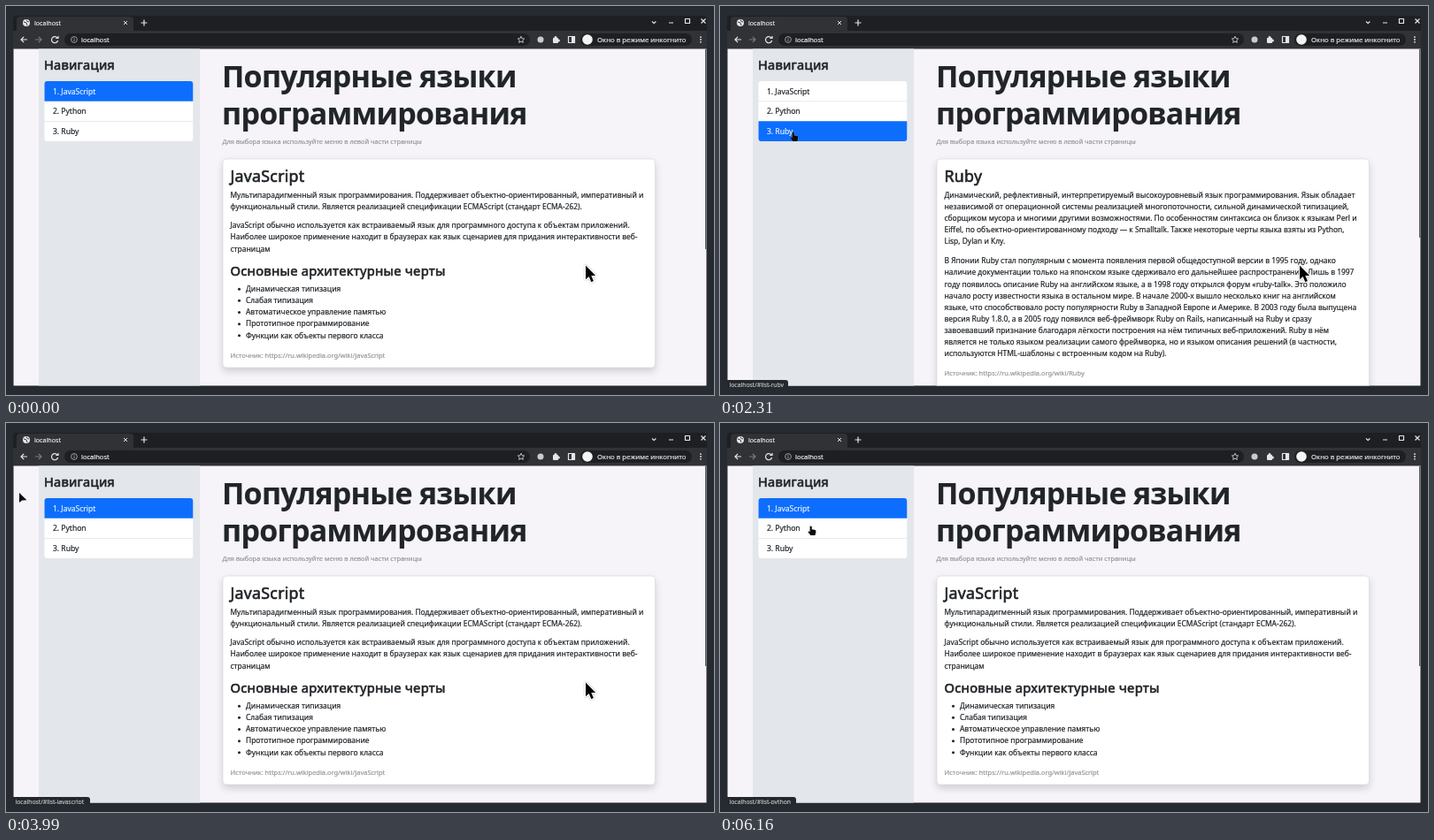
An HTML page with a canvas that plays this animation: 800x440 px, repeating every 6.23 s.

```html
<!DOCTYPE html>
<html lang="ru">
<head>
<meta charset="utf-8">
<title>localhost</title>
<style>
html, body { margin: 0; width: 800px; height: 440px; overflow: hidden; background: #262b31; }
canvas { display: block; filter: blur(0.35px); }
</style>
</head>
<body>
<canvas id="stage" width="800" height="440"></canvas>
<script>
const ctx = document.getElementById('stage').getContext('2d');
const LOOP = 6230, STEP = 70, LINE = 13.15;
const INK = '#212529', MUTED = '#94969a', ICON = '#e4e6e8', DIM = '#8d9195';
const NAMES = ['JavaScript', 'Python', 'Ruby'];

// Each block: kind, first baseline, lines
const PAGES = [
  [
    ['p', 216.7, `Мультипарадигменный язык программирования. Поддерживает объектно-ориентированный, императивный и
функциональный стили. Является реализацией спецификации ECMAScript (стандарт ECMA-262).`],
    ['p', 251.3, `JavaScript обычно используется как встраиваемый язык для программного доступа к объектам приложений.
Наиболее широкое применение находит в браузерах как язык сценариев для придания интерактивности веб-
страницам`],
    ['h', 304.7, 'Основные архитектурные черты'],
    ['li', 323, `Динамическая типизация
Слабая типизация
Автоматическое управление памятью
Прототипное программирование
Функции как объекты первого класса`],
    ['src', 397.5, 'Источник: https://ru.wikipedia.org/wiki/JavaScript']
  ],
  [
    ['p', 216.7, `Высокоуровневый язык программирования общего назначения с динамической строгой типизацией и
автоматическим управлением памятью, ориентированный на повышение производительности разработчика,
читаемости кода и его качества, а также на обеспечение переносимости написанных на нём программ.`],
    ['p', 264.7, `Стандартная библиотека включает большой набор полезных переносимых функций, начиная с возможностей
для работы с текстом и заканчивая средствами для написания сетевых приложений. Дополнительные
возможности, такие как математическое моделирование, работа с оборудованием, написание веб-приложений
или разработка игр, могут реализовываться посредством обширного количества сторонних библиотек, а также
интеграцией библиотек, написанных на Си или C++, при этом и сам интерпретатор Python может
интегрироваться в проекты, написанные на этих языках.`],
    ['h', 357.5, 'Популярность языка'],
    ['p', 375.3, `Python стал одним из самых популярных языков, он используется в анализе данных, машинном обучении,
DevOps и веб-разработке, а также в других сферах, включая разработку игр. За счёт читабельности, простого
синтаксиса и отсутствия необходимости в компиляции язык хорошо подходит для обучения
программированию, позволяя концентрироваться на изучении алгоритмов, концептов и парадигм.`]
  ],
  [
    ['p', 216.7, `Динамический, рефлективный, интерпретируемый высокоуровневый язык программирования. Язык обладает
независимой от операционной системы реализацией многопоточности, сильной динамической типизацией,
сборщиком мусора и многими другими возможностями. По особенностям синтаксиса он близок к языкам Perl и
Eiffel, по объектно-ориентированному подходу — к Smalltalk. Также некоторые черты языка взяты из Python,
Lisp, Dylan и Клу.`],
    ['p', 291.2, `В Японии Ruby стал популярным с момента появления первой общедоступной версии в 1995 году, однако
наличие документации только на японском языке сдерживало его дальнейшее распространение. Лишь в 1997
году появилось описание Ruby на английском языке, а в 1998 году открылся форум «ruby-talk». Это положило
начало росту известности языка в остальном мире. В начале 2000-х вышло несколько книг на английском
языке, что способствовало росту популярности Ruby в Западной Европе и Америке. В 2003 году была выпущена
версия Ruby 1.8.0, а в 2005 году появился веб-фреймворк Ruby on Rails, написанный на Ruby и сразу
завоевавший признание благодаря лёгкости построения на нём типичных веб-приложений. Ruby в нём
является не только языком реализации самого фреймворка, но и языком описания решений (в частности,
используются HTML-шаблоны с встроенным кодом на Ruby).`],
    ['src', 418, 'Источник: https://ru.wikipedia.org/wiki/Ruby']
  ]
];

// Keyframes: time, x, y
const POINTER = [
  [450, 4, 84], [950, 103, 117], [1650, 103, 117], [1950, 83, 143], [2650, 83, 143],
  [2900, 84, 119], [3150, 84, 119], [3350, 82, 98], [3620, 82, 98], [3990, 15, 79], [4130, 0, 76],
  [5400, 4, 84], [5850, 103, 117], [LOOP, 103, 117]
];
const BIG_POINTER = [[0, 655, 293.5], [4650, 655, 293.5], [4970, 605.5, 313.5], [5450, 500, 445], [LOOP, 500, 445]];

function at(keys, t) {
  let i = 1;
  while (i < keys.length - 1 && keys[i][0] < t) i++;
  const [a, b] = [keys[i - 1], keys[i]];
  const k = Math.min(1, Math.max(0, (t - a[0]) / (b[0] - a[0])));
  const e = k * k * (3 - 2 * k);
  return [a[1] + (b[1] - a[1]) * e, a[2] + (b[2] - a[2]) * e];
}

function rect(x, y, w, h, fill, radius = 0) {
  ctx.fillStyle = fill;
  ctx.beginPath();
  ctx.roundRect(x, y, w, h, radius);
  ctx.fill();
}

function text(str, x, y, size, fill = INK, { weight = 400, spacing = 0, edge = 0.2 } = {}) {
  ctx.font = `${weight} ${size}px "Noto Sans", "Open Sans", sans-serif`;
  ctx.letterSpacing = spacing + 'px';
  ctx.fillStyle = ctx.strokeStyle = fill;
  ctx.lineWidth = edge;
  ctx.lineJoin = 'round';
  ctx.fillText(str, x, y);
  ctx.strokeText(str, x, y);
}

// A semi-bold look for section headings
function heading(str, x, y, size) {
  text(str, x, y, size, INK, { spacing: 0.25, edge: 0.65 });
}

function stroke(d, color = ICON, width = 1.2) {
  ctx.strokeStyle = color;
  ctx.lineWidth = width;
  ctx.stroke(new Path2D(d));
}

function dot(x, y, r, fill) {
  ctx.fillStyle = fill;
  ctx.beginPath();
  ctx.arc(x, y, r, 0, 7);
  ctx.fill();
}

function ring(x, y, r, color = ICON, width = 1) {
  ctx.strokeStyle = color;
  ctx.lineWidth = width;
  ctx.beginPath();
  ctx.arc(x, y, r, 0, 7);
  ctx.stroke();
}

function clip(x, y, w, h, paint) {
  ctx.save();
  ctx.beginPath();
  ctx.rect(x, y, w, h);
  ctx.clip();
  paint();
  ctx.restore();
}

function shape(d, x, y, fill, edge, width) {
  const path = new Path2D(d);
  ctx.save();
  ctx.translate(x, y);
  ctx.lineJoin = 'round';
  if (edge) {
    ctx.shadowColor = 'rgba(0,0,0,.35)';
    ctx.shadowBlur = 2;
    ctx.strokeStyle = edge;
    ctx.lineWidth = width;
    ctx.stroke(path);
    ctx.shadowColor = 'transparent';
  }
  ctx.fillStyle = fill;
  ctx.fill(path);
  ctx.restore();
}

function browser(focused) {
  const c = focused ? ICON : DIM;
  rect(8, 11, 784, 419, focused ? '#1d1f22' : '#3c4043', [4, 4, 0, 0]);
  rect(12, 12, 132, 18, focused ? '#303236' : '#35383b', [4, 4, 0, 0]);
  rect(8, 28, 784, 21, '#303236');
  dot(23, 19, 4, c);
  stroke('M20 18 l3 1 1 3 M23 15.5 l1 2 2 .5', '#43464a', 1);
  text('localhost', 32, 21.5, 7.1, c);
  stroke('M133 17 l4 4 m0 -4 l-4 4', c, 1);
  stroke('M152.5 19 h7 M156 15.5 v7', c);
  stroke('M730 17.5 l2.2 2.2 2.2 -2.2 M749 19 h5', c);
  stroke('M767.5 14.5 h5 v5 h-5 z', c);
  stroke('M785.5 14.5 l5 5 m0 -5 l-5 5', c);

  stroke('M24 38 h-7 m3.2 -3.2 l-3.2 3.2 3.2 3.2');
  stroke('M33 38 h7 m-3.2 -3.2 l3.2 3.2 -3.2 3.2', '#777a7e');
  stroke('M58 36 a3.6 3.6 0 1 0 .6 3 M59 34 v2.5 h-2.7');
  rect(66, 31, 526, 14, '#1d1f22', 7);
  ring(77, 38, 3.4, '#b8babd', 0.8);
  stroke('M77 37.5 v2.3 M77 35.8 v.9', '#b8babd', 0.9);
  text('localhost', 85, 40.6, 7.5, '#eeeff0');
  stroke('M582 34.3 l1.1 2.4 2.6 .3 -1.9 1.8 .5 2.6 -2.3 -1.3 -2.3 1.3 .5 -2.6 -1.9 -1.8 2.6 -.3 z', ICON, 0.8);
  dot(604, 38, 3.5, '#c9cbce');
  rect(618, 36, 6, 6, ICON, 1);
  dot(621, 35.5, 1.5, ICON);
  dot(624.4, 39, 1.5, ICON);
  stroke('M635.5 34.5 h7 v7 h-7 z');
  rect(639, 34, 4, 8, ICON);
  rect(649, 31, 126, 14, '#1d1f22', 7);
  dot(657, 38, 5.8, '#f4f4f4');
  text('Окно в режиме инкогнито', 668, 40.8, 7.75, '#e4e5e7');
  for (const y of [35.2, 38, 40.8]) dot(785, y, 0.9, ICON);
}

function sidebar(active) {
  rect(37, 48, 182, 382, '#e3e6ea');
  heading('Навигация', 43, 72.3, 14.5);
  rect(43.5, 85, 167.8, 68, '#fff', 3);
  NAMES.forEach((name, i) => {
    const y = 85 + i * 22.6, on = i === active;
    const top = i ? 0 : 3, bottom = i === 2 ? 3 : 0;
    if (on) rect(43.5, y, 167.8, 22.8, '#0d6efd', [top, top, bottom, bottom]);
    else if (i && i - 1 !== active) rect(43.5, y, 167.8, 0.7, '#dfe1e4');
    text(`${i + 1}. ${name}`, 53, y + 14.8, 8.5, on ? '#e8f1ff' : INK);
  });
}

function block([kind, top, body]) {
  body.split('\n').forEach((line, i) => {
    const y = top + i * LINE;
    if (kind === 'h') heading(line, 253.5, y, 14.7);
    else if (kind === 'src') text(line, 253.5, y, 7.45, MUTED);
    else {
      if (kind === 'li') dot(263.5, y - 2.8, 1.5, INK);
      text(line, kind === 'li' ? 271 : 253.5, y, 8.42);
    }
  });
}

function card(active) {
  ctx.save();
  ctx.shadowColor = 'rgba(0,0,0,.17)';
  ctx.shadowBlur = 9;
  ctx.shadowOffsetY = 4;
  rect(245, 173, 488.5, active ? 300 : 236, '#fff', 4);
  ctx.restore();
  ctx.strokeStyle = '#d9dadd';
  ctx.lineWidth = 0.7;
  ctx.stroke();
  heading(NAMES[active], 253.5, 199, 17.8);
  PAGES[active].forEach(block);
}

function page(active) {
  const title = { weight: 700, spacing: -0.75, edge: 0.1 };
  rect(8, 48, 784, 382, '#f6f4f9');
  sidebar(active);
  text('Популярные языки', 244, 91.9, 34, INK, title);
  text('программирования', 244, 133.9, 34, INK, title);
  text('Для выбора языка используйте меню в левой части страницы', 244.5, 156.2, 7.35, MUTED);
  card(active);
  rect(790, 49, 1.5, active ? 213 : 226, '#55595e');
}

function status(row) {
  rect(8, 423, [87, 78, 69][row], 9, '#25292d', [0, 3, 0, 0]);
  clip(8, 423, 100, 8, () =>
    text('localhost/#list-' + NAMES[row].toLowerCase(), 10.5, 430.8, 6.8, '#b9bcbf'));
}

const ARROW = 'M0 0 V15.8 L3.7 12.5 L6.3 18.7 L8.9 17.6 L6.3 11.5 H11.2 Z';
const SMALL_ARROW = 'M0 0 V11 L3.2 8.4 L8.4 8.2 Z';
const HAND = 'M-1.4 0 Q-.3 -1.2 .7 0 V3.2 L4.4 4 Q5.6 4.4 5.4 6 L4.4 10 H-.6 L-3.4 6.4 Q-3.6 4.8 -1.4 6 Z';

function draw(t) {
  const active = t >= 1260 && t < 2170 ? 1 : t >= 2170 && t < 3450 ? 2 : 0;
  const [x, y] = at(POINTER, t);
  const visible = x > 8 && (t < 4130 || t > 5400);
  const inList = x > 43 && y > 83 && y < 153;
  const row = Math.min(2, Math.max(0, Math.floor((y - 83) / 22.6)));
  const leaving = t >= 3620 && t < 4130;

  rect(0, 0, 800, 440, '#262b31');
  browser(t < 4410 || t >= 5320);
  clip(8.5, 48.5, 783, 381, () => page(active));
  if (visible && inList) status(row);
  else if (leaving) status(0);
  if (visible) {
    if (inList) shape(HAND, x, y, '#0b0c0d', 'rgba(255,255,255,.45)', 0.8);
    else shape(SMALL_ARROW, x, y, '#0b0c0d');
  }
  const [bx, by] = at(BIG_POINTER, t);
  if (by < 440) shape(ARROW, bx, by, '#000', '#fff', 2.4);
}

const start = performance.now();
function tick() {
  const t = (performance.now() - start) % LOOP;
  draw(Math.floor(t / STEP) * STEP);
  requestAnimationFrame(tick);
}
tick();
</script>
</body>
</html>
```
